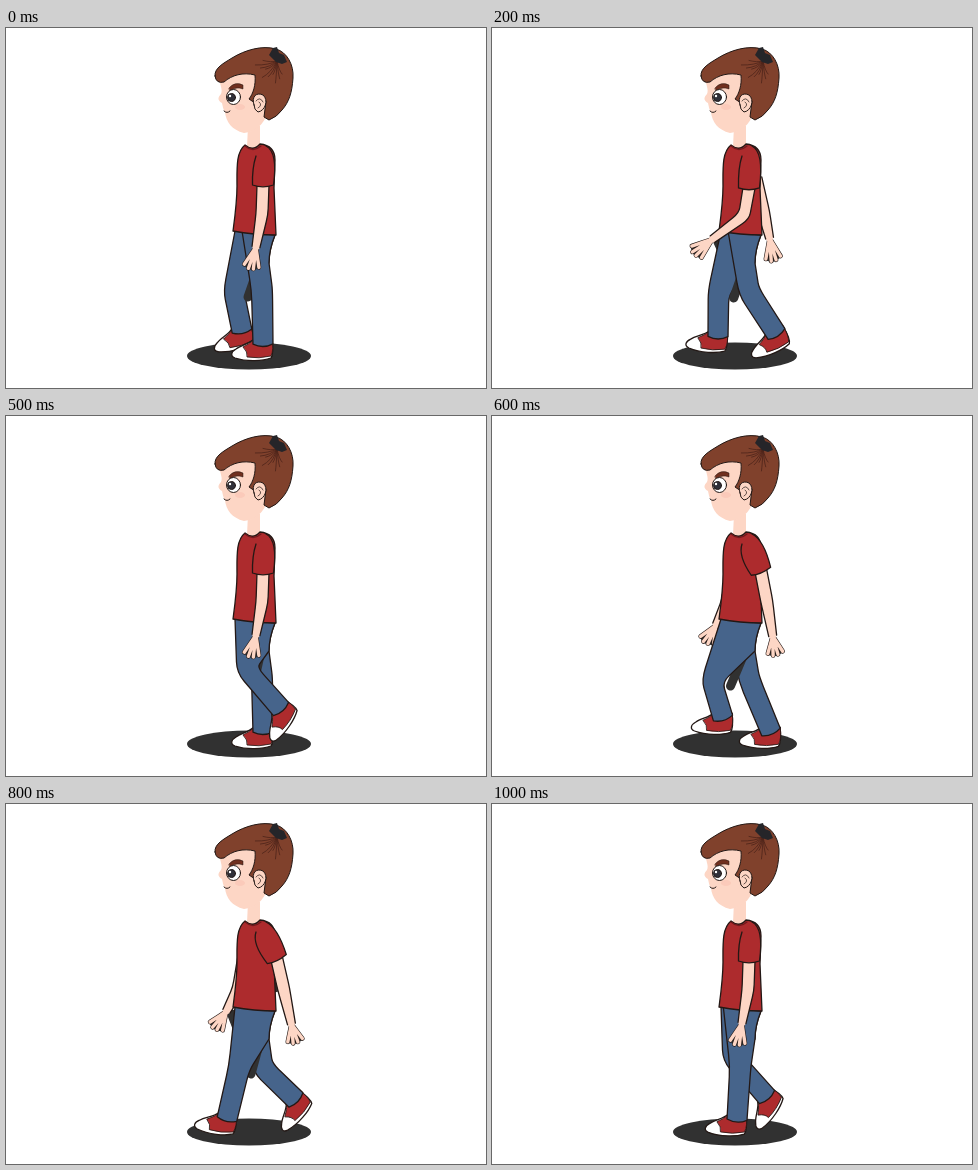
Recreate the animation shown at these times as an HTML page. Size 480x360 px, loop 1100 ms.

```html
<!DOCTYPE html>
<html lang="en">
<head>
<meta charset="utf-8">
<title>Walk cycle</title>
<style>
html, body { margin: 0; width: 100%; height: 100%; overflow: hidden; background: #fff; }
svg { display: block; width: 100vw; height: 100vh; }
</style>
</head>
<body>
<svg viewBox="0 0 480 360" stroke-linejoin="round" stroke-linecap="round">
  <ellipse cx="243" cy="328" rx="62" ry="13.500" fill="#313131"/>
  <g id="walker"></g>
  <g stroke="#231815">
    <path d="M213 50C214 57 217 62 215 66C212 69 211 72 216 75C217 79 217 81 219 84C220 94 226 102 238 105C249 104 258 96 261 86L262 42L235 36Z" fill="#fdd6c5" stroke="none"/>
    <ellipse cx="234" cy="79" rx="5" ry="3" fill="#fbcaba" stroke="none"/>
    <path d="M209 48C208 40 218 35 226 30C239 22 256 17 270 21C281 24 288 37 287 50C286 65 283 74 276 82Q271 89 263 92L258 89L260 73L253 66L249 75L243 71C247 66 250 57 249 47C237 44 226 47 218 54Q210 56 209 48Z" fill="#80412c"/>
    <path id="strands" fill="none" stroke="#4d241a" stroke-width=".8"/>
    <path d="M263 27L267 20L271 19L273 25L278 27L281 34L276 36L270 34Z" fill="#252529" stroke="none"/>
    <path d="M248 77C245 68 251 64 257 67C263 72 259 83 252 84Q248 82 248 77Z" fill="#fdd6c5"/>
    <path d="M250 73Q254 68 257 74M253 74Q257 77 252 80" fill="none" stroke-width=".7"/>
    <path d="M223 60Q229 53 237 57L237 61Q230 58 224 63Z" fill="#71301f" stroke-width=".5"/>
    <ellipse cx="227.500" cy="69" rx="7" ry="7.500" fill="#fff"/>
    <circle cx="225.500" cy="69.500" r="4" fill="#303039"/>
    <circle cx="224" cy="68" r="1.200" fill="#fff" stroke="none"/>
    <path d="M218 83Q221 86 224 83" fill="none"/>
  </g>
</svg>
<script>
const STEP = 100, STEPS = 11, BEATS = 12;
const INK = '#231815', DARK = '#313131', RED = '#ad2b2d', JEANS = '#46648b', SKIN = '#fdd6c5';
const walker = document.getElementById('walker');

// Key poses of one leg; the beats between them are interpolated
const STRIDE = [
  { beat: 0, knee: [256, 262], ankle: [257, 316], tilt: 0 },      // standing
  { beat: 1, knee: [257, 263], ankle: [279, 316], tilt: 2 },      // pushing
  { beat: 3, knee: [257, 264], ankle: [290, 296], tilt: -48 },    // lifting
  { beat: 5, knee: [241, 254], ankle: [275, 293], tilt: -55 },    // swinging
  { beat: 6, knee: [228, 264], ankle: [236, 303], tilt: -15 },    // passing
  { beat: 7, knee: [220, 265], ankle: [231, 302], tilt: 2 },      // reaching
  { beat: 9, knee: [233, 264], ankle: [221, 315], tilt: 8 },      // landing
];

// Arm poses: sleeve end, elbow, wrist, fingertips
const DOWN = [[257, 157], [256, 186], [250, 219], [244, 242]];
const NEAR_ARM = {
  front: [[257, 160], [252, 188], [220, 211], [200, 226]],
  back: [[271, 155], [278, 185], [286, 220], [290, 240]]
};
const FAR_ARM = {
  front: [[238, 150], [232, 185], [220, 207], [207, 225]],
  back: [[264, 150], [272, 185], [278, 210], [282, 234]]
};

const lerp = (a, b, t) => a + (b - a) * t;
const mix = (a, b, t) => [lerp(a[0], b[0], t), lerp(a[1], b[1], t)];
const clamp = v => Math.min(1, Math.max(0, v));
const path = (d, fill, stroke = INK, width = 1.3) =>
  `<path d="${d}" fill="${fill}" stroke="${stroke}" stroke-width="${width}"/>`;
const unit = (a, b) => {
  const length = Math.hypot(b[0] - a[0], b[1] - a[1]) || 1;
  return [(b[0] - a[0]) / length, (b[1] - a[1]) / length];
};
const beside = (p, dir, w) => [p[0] - dir[1] * w, p[1] + dir[0] * w];
const bend = (a, k, b) => `L${mix(a, k, .8)}Q${k} ${mix(k, b, .2)}L${b}`;

function legPose(beat) {
  const n = STRIDE.findLastIndex(key => key.beat <= beat);
  const a = STRIDE[n], b = STRIDE[(n + 1) % STRIDE.length];
  const t = (beat - a.beat) / ((b.beat || BEATS) - a.beat);
  return {
    knee: mix(a.knee, b.knee, t),
    ankle: mix(a.ankle, b.ankle, t),
    tilt: lerp(a.tilt, b.tilt, t)
  };
}

// swing runs from -1, in front, to 1, behind
const armPose = (arm, swing) =>
  DOWN.map((p, j) => mix(p, (swing < 0 ? arm.front : arm.back)[j], Math.abs(swing)));

function edges(top, mid, end, wMid, wEnd) {
  const u = unit(top, mid), v = unit(mid, end);
  const m = unit([0, 0], [u[0] + v[0], u[1] + v[1]]);
  return [1, -1].map(side => [beside(mid, m, side * wMid), beside(end, v, side * wEnd)]);
}

function leg({ knee, ankle, tilt }) {
  const [[kl, al], [kr, ar]] = edges([250, 210], knee, ankle, 10.5, 10);
  const waist = [lerp(229, 236, clamp((knee[0] - 245) / 10)), 203];
  const thigh = [263, 235];
  const [dx, dy] = unit(knee, ankle);
  const cuff = [ankle[0] + dx * 5, ankle[1] + dy * 5];
  const shoe = `<g transform="translate(${ankle}) rotate(${tilt})">` +
    path('M-9-5C-14 0-22 1-27 5C-32 8-33 12-28 14C-16 18 0 17 8 14Q11 10 9-5Z', '#fff') +
    path('M-9-5C-13 0-17 1-20 3Q-15 8-16 13Q-4 15 8 12Q11 6 9-5Z', RED, INK, .8) + '</g>';
  return shoe +
    path(`M${waist}${bend(waist, kl, al)}Q${cuff} ${ar}${bend(ar, kr, thigh)}Q263 222 269 207Z`, JEANS);
}

function hand(wrist, tip) {
  const dir = unit(wrist, tip);
  const tips = [-8, -3, 2, 7].map(w => beside(mix(wrist, tip, 1 - Math.abs(w) / 40), dir, w));
  const fingers = tips.map(t => `M${wrist}L${mix(wrist, t, .45)}L${t}`).join('');
  return path(`M${mix(wrist, tip, .2)}L${tips.join('L')}Z`, DARK, DARK, 2) +
    path(fingers, 'none', INK, 4.6) + path(fingers, 'none', SKIN, 3.4);
}

function arm([start, elbow, wrist, tip]) {
  const [[el, wl], [er, wr]] = edges(start, elbow, wrist, 6, 4);
  const u = unit(start, elbow), sl = beside(start, u, 6), sr = beside(start, u, -6);
  const palm = mix(wrist, tip, .3);
  return hand(wrist, tip) +
    path(`M${sl}${bend(sl, el, wl)}L${palm}L${wr}${bend(wr, er, sr)}`, SKIN, 'none') +
    path(`M${sl}${bend(sl, el, wl)}M${wr}${bend(wr, er, sr)}`, 'none');
}

function sleeve(end) {
  const u = unit([257, 126], end), left = beside(end, u, 10.5), right = beside(end, u, -10.5);
  return path(`M250 128Q246 140 ${left}Q${mix(end, [end[0], end[1] + 6], .6)} ${right}Q272 124 260 118`, RED);
}

// Dark backing between an arm and the body
const armGap = ([start, elbow, wrist]) =>
  path(`M${start}L${elbow}L268 ${elbow[1] + 3}Z`, DARK, DARK) +
  (wrist[0] < 240 ? path(`M${wrist}L236 206L230 232Z`, DARK, DARK) : '');

function draw(i) {
  // Each leg skips the beat where it would cross the other a second time
  const nearLeg = legPose(i + (i > 5));
  const farLeg = legPose((i + 6 + (i > 4)) % BEATS);
  const wave = Math.sin(2 * Math.PI * i / (STEPS - 1));
  const swing = -Math.sign(wave) * Math.abs(wave) ** .3;
  const near = armPose(NEAR_ARM, swing), far = armPose(FAR_ARM, -swing);
  const [gapX, gapY] = mix(nearLeg.knee, farLeg.knee, .5);

  walker.innerHTML =
    armGap(far) + armGap(near) + arm(far) + leg(farLeg) +
    path(`M257 226L${gapX} ${gapY + 6}`, 'none', DARK, 9) +
    leg(nearLeg) +
    path('M242 98L241 119Q247 124 254 118L254 98Z', SKIN, 'none') +
    path('M239 117Q247 124 254 116C264 117 269 122 269 132L268 160L270 207Q248 207 227 203C229 188 231 174 231 158C231 140 230 124 239 117Z', RED) +
    path('M239 118Q247 125 255 118', 'none', '#711a1d') +
    arm(near) + sleeve(near[0]);
}

// Hair strands fan out from the crown
document.getElementById('strands').setAttribute('d', Array.from({ length: 10 }, (_, n) => {
  const a = 1.2 + n * .22, r = 14 + n % 3 * 4;
  return `M271 33Q${271 + r * .4 * Math.cos(a)} ${35 + r * .6 * Math.sin(a)} ${271 + r * Math.cos(a)} ${33 + r * Math.sin(a)}`;
}).join(''));

let shown = -1;
function tick() {
  const i = Math.floor(performance.now() / STEP) % STEPS;
  if (i !== shown) draw(shown = i);
  requestAnimationFrame(tick);
}
tick();
</script>
</body>
</html>
```
